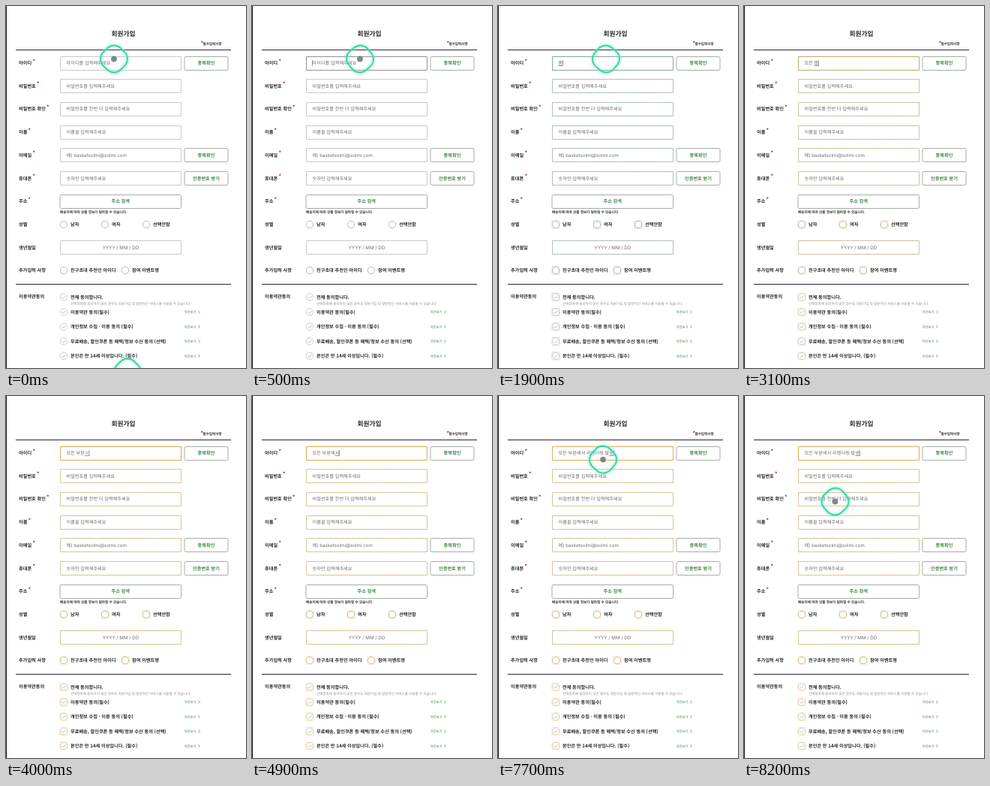
Animation of 320x482 px, one loop 8.3 s. Source, as an HTML page:

```html
<!DOCTYPE html>
<html lang="ko">
<head>
<meta charset="utf-8">
<title>회원가입</title>
<style>
  html, body { margin: 0; width: 100%; height: 100%; overflow: hidden; background: #fff; }
  svg { display: block; width: 320px; height: 482px; }
  text { font-family: "Noto Sans CJK KR", "Noto Sans CJK", sans-serif; text-rendering: geometricPrecision; white-space: pre; }
  .latin { font-family: Inter, "Noto Sans CJK KR", sans-serif; }
</style>
</head>
<body>
<svg id="stage" viewBox="0 0 320 482"></svg>
<script>
const LOOP = 8300;
const INK = '#262626', GRAY = '#6c6c6c', GREEN = '#3f8244', LINE = '#b9bcb9';
const stage = document.getElementById('stage');

function add(tag, attrs, parent = stage) {
  const el = document.createElementNS('http://www.w3.org/2000/svg', tag);
  for (const key in attrs) el.setAttribute(key, attrs[key]);
  parent.append(el);
  return el;
}

// Text placed by the vertical middle of its glyphs
function text(x, mid, str, size = 6.2, fill = INK, weight = 700, anchor = 'start') {
  const el = add('text', { x, y: mid + size * 0.36, 'font-size': size, fill, 'font-weight': weight, 'text-anchor': anchor });
  el.textContent = str;
  return el;
}

function box(x, y, width, height, stroke, rx = 0.5, parent = stage) {
  return add('rect', { x, y, width, height, rx, fill: 'none', stroke, 'stroke-width': 0.8 }, parent);
}

const boxTop = mid => Math.floor(mid - 9) + 0.5;
const star = (x, mid) => text(x, mid, '*', 7, '#a8323c');
const rule = y => add('rect', { x: 13, y, width: 287, height: 1, fill: '#2b2630' });
const placeholder = (mid, str) => text(80.5, mid, str, 6.2, GRAY, 400);

function button(x, mid, width, str) {
  box(x, boxTop(mid), width, 18, '#8d9a8f', 1.8);
  text(x + width / 2, mid, str, 6.2, GREEN, 700, 'middle');
}

// Outlines that appear when a component renders again
const outlines = [];
const outline = (x, y, w, h) => outlines.push([x, y, w, h]);

function field(mid) {
  const rect = [72.5, boxTop(mid), 161, 18];
  outline(...rect);
  return box(...rect, LINE);
}

function radio(cx, cy, str) {
  add('circle', { cx, cy, r: 4.7, fill: '#fff', stroke: '#a9aaa9', 'stroke-width': 0.8 });
  outline(cx - 5, cy - 5, 10, 10);
  text(cx + 9, cy, str);
}

function agree(cy, str, link) {
  add('circle', { cx: 77, cy, r: 4.7, fill: '#fff', stroke: '#b9b9b9', 'stroke-width': 0.7 });
  add('path', { d: `M74.6 ${cy}l1.8 1.8 3.2-3.4`, fill: 'none', stroke: '#aaa', 'stroke-width': 0.8 });
  outline(72, cy - 5, 10, 10);
  text(86, cy, str);
  if (!link) return;
  text(237.5, cy, '약관보기', 4.4, GREEN, 400);
  add('path', { d: `M256.4 ${cy - 2}l2 2-2 2`, fill: 'none', stroke: GREEN, 'stroke-width': 0.7 });
}

add('rect', { width: 1, height: 482, fill: '#111' });
text(156.5, 37, '회원가입', 8.7, INK, 700, 'middle');
star(259.5, 49);
text(262.5, 50, '필수입력사항', 4.55);
rule(58);

const labels = [
  [76, '아이디', 35.5], [106.5, '비밀번호', 41], [137, '비밀번호 확인', 54], [168, '이름', 29.5],
  [198.5, '이메일', 35.5], [229.5, '휴대폰', 35.5], [260, '주소', 29.5], [291, '성별'],
  [321.5, '생년월일'], [352, '추가입력 사항'], [387, '이용약관동의']
];
for (const [mid, str, starX] of labels) {
  text(17, mid, str);
  if (starX) star(starX, mid - 2.8);
}

const idField = field(76);
[106.5, 137, 168, 198.5, 229.5, 321.5].forEach(field);
placeholder(106.5, '비밀번호를 입력해주세요');
placeholder(137, '비밀번호를 한번 더 입력해주세요');
placeholder(168, '이름을 입력해주세요');
placeholder(198.5, '예) basketsolmi@solmi.com').classList.add('latin');
placeholder(229.5, '숫자만 입력해주세요');
text(153, 321.5, 'YYYY / MM / DD', 6.2, GRAY, 400, 'middle').classList.add('latin');

button(238, 76, 58, '중복확인');
button(238, 198.5, 58, '중복확인');
button(238, 229.5, 58, '인증번호 받기');
button(72, 260, 161.5, '주소 검색');
text(72, 274, '배송지에 따라 상품 정보가 달라질 수 있습니다.', 4.6);

radio(77, 291, '남자');
radio(132, 291, '여자');
radio(187, 291, '선택안함');
radio(77, 352, '친구초대 추천인 아이디');
radio(159, 352, '참여 이벤트명');

rule(370);
agree(387.5, '전체 동의합니다.');
text(86, 396, '선택항목에 동의하지 않은 경우도 회원가입 및 일반적인 서비스를 이용할 수 있습니다.', 4.55, '#8a8a8a', 400);
agree(407.5, '이용약관 동의(필수)', true);
agree(427, '개인정보 수집 · 이용 동의 (필수)', true);
agree(446.5, '무료배송, 할인쿠폰 등 혜택/정보 수신 동의 (선택)', true);
agree(466, '본인은 만 14세 이상입니다. (필수)', true);

const glow = add('g', {});
outlines.forEach(([x, y, w, h], i) => {
  const el = box(x, y, w, h, 'currentColor', 0, glow);
  el.setAttribute('stroke-dasharray', i ? '2 0.8' : 'none');
  el.setAttribute('stroke-opacity', i ? 0.65 : 1);
});

const typed = text(80.5, 76, '', 6.2, GRAY, 400);
const caret = add('rect', { y: 72, width: 0.5, height: 8, fill: '#333' });
const under = add('rect', { y: 79.3, height: 0.6, fill: '#555' });

// Pointer: a soft green ring with an optional dot
const defs = add('defs', {});
const blur = add('filter', { id: 'soft', x: '-50%', y: '-50%', width: '200%', height: '200%' }, defs);
add('feGaussianBlur', { stdDeviation: 1.6 }, blur);

function makeRing() {
  const g = add('g', {});
  const shape = { x: -16.5, y: -16.5, width: 33, height: 33, rx: 13, fill: 'none' };
  add('rect', { ...shape, stroke: '#7fe8c8', 'stroke-width': 3.6, opacity: 0.75, filter: 'url(#soft)' }, g);
  add('rect', { ...shape, stroke: '#2fd3a5', 'stroke-width': 1.7 }, g);
  return g;
}
const ring = makeRing(), lowRing = makeRing();
lowRing.setAttribute('transform', 'translate(162 487.5) rotate(45)');
const dot = add('circle', { r: 3.9, fill: '#737b79', 'fill-opacity': 0.9 });

// Keystrokes: time, settled text, syllable being composed
const A = '모든 ', B = '모든 부분에서 ', C = B + '리렌더링 ';
const strokes = [
  [800, '', 'ㅁ'], [1400, '', '모'], [1900, '', '몯'], [2300, '모', '드'], [2600, '모', '든'],
  [2800, A, ''], [2900, A, 'ㅂ'], [3000, A, '부'], [3100, A, '붑'], [3500, A + '부', '부'],
  [3600, A + '부', '분'], [4000, A + '부분', 'ㅇ'], [4200, A + '부분', '에'], [4400, A + '부분', '엣'],
  [4600, A + '부분에', '서'], [5100, B, ''], [5300, B, 'ㄹ'], [5400, B, '리'], [5600, B + '리', '레'],
  [5800, B + '리', '렌'], [6000, B + '리렌', 'ㄷ'], [6100, B + '리렌', '더'], [6300, B + '리렌더', '리'],
  [6500, B + '리렌더', '링'], [6700, C, ''], [6900, C, 'ㅂ'], [7000, C, '바'], [7200, C, '발'],
  [7500, C + '발', '새'], [7700, C + '발', '생']
];

const heat = ['#37afa9', '#63b19e', '#80b393', '#97b488', '#abb67d', '#beb771', '#cfb965', '#dfba57', '#efbb49', '#febc38'];
const path = [[6900, 144, 70], [7400, 146, 66], [7800, 139, 88], [8200, 121.5, 140.5]];

const clamp = v => Math.max(0, Math.min(1, v));

function pointer(t) {
  if (t < path[0][0]) return [144, 70.5];
  const i = path.findIndex(p => p[0] > t);
  if (i < 0) return path[path.length - 1].slice(1);
  const [t0, x0, y0] = path[i - 1], [t1, x1, y1] = path[i];
  const k = (t - t0) / (t1 - t0);
  const e = k * k * (3 - 2 * k);
  return [x0 + (x1 - x0) * e, y0 + (y1 - y0) * e];
}

function drawField(t) {
  const count = strokes.filter(s => s[0] <= t).length;
  const [, settled, syllable] = count ? strokes[count - 1] : [0, '', ''];
  const value = settled + syllable;
  typed.textContent = value || '아이디를 입력해주세요';
  const width = value ? typed.getComputedTextLength() : 0;
  const last = syllable ? typed.getSubStringLength(settled.length, 1) : 0;
  const focused = t >= 100;
  under.setAttribute('x', 80.5 + width - last);
  under.setAttribute('width', last);
  caret.setAttribute('x', 80.5 + width);
  caret.setAttribute('opacity', focused ? 1 : 0);
  idField.setAttribute('stroke', focused ? '#777' : LINE);
  glow.setAttribute('opacity', count ? 0.85 : 0);
  glow.setAttribute('color', heat[Math.min(Math.floor(count * 0.7), heat.length - 1)]);
}

function drawPointer(t) {
  const [x, y] = pointer(t);
  const turn = 45 + 5 * Math.sin(t / 420);
  ring.setAttribute('transform', `translate(${x} ${y}) rotate(${turn})`);
  ring.setAttribute('opacity', t < 5000 ? clamp((2700 - t) / 250) : clamp((t - 6900) / 200));
  lowRing.setAttribute('opacity', clamp((300 - t) / 200));
  dot.setAttribute('cx', x);
  dot.setAttribute('cy', y);
  dot.setAttribute('opacity', t < 700 || t >= 6900 ? 1 : 0);
}

const start = performance.now();
function frame() {
  const t = (performance.now() - start) % LOOP;
  drawField(t);
  drawPointer(t);
  requestAnimationFrame(frame);
}
frame();
</script>
</body>
</html>
```
